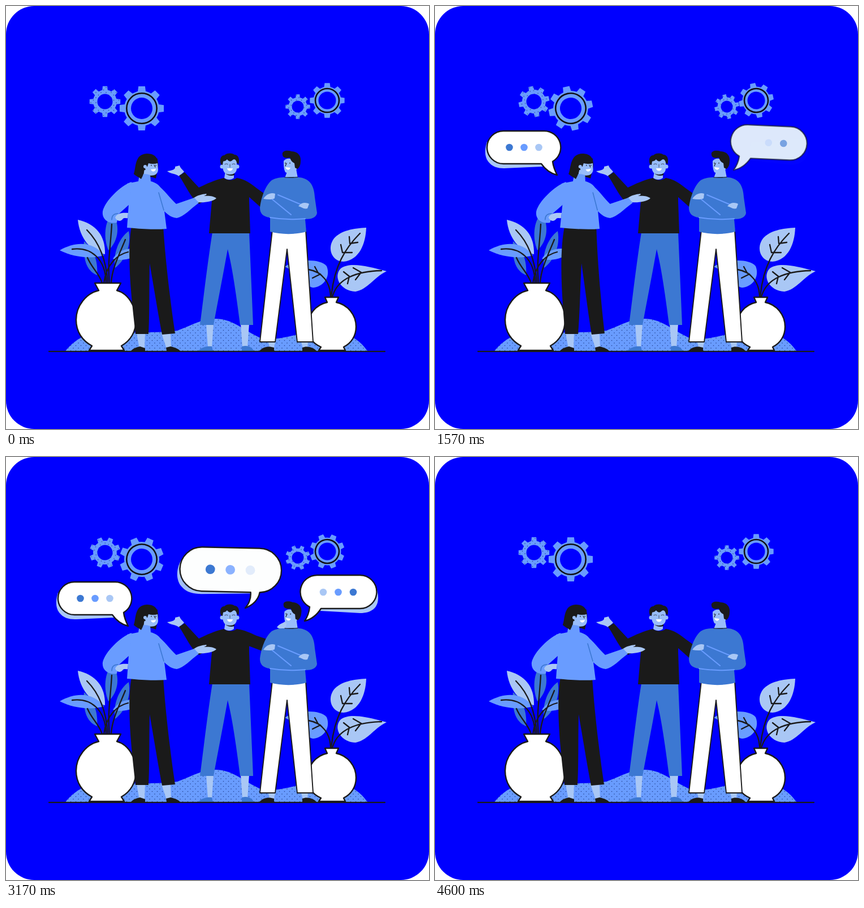
An HTML page for the animation above (4.63 s loop, 748 by 748 pixels).

```html
<!DOCTYPE html>
<html lang="en">
<head>
<meta charset="utf-8">
<title>Team talk</title>
<style>
html, body { margin: 0; width: 100%; height: 100%; overflow: hidden; background: #fff; }
svg { display: block; width: 100vw; height: 100vh; }
.k { fill: #1a1a1a; }
.l { fill: #699cff; }
.m { fill: #3c78d2; }
.p { fill: #a9c7f5; }
.s { fill: #98bdfa; }
.w { fill: #fff; }
.o { stroke: #1a1a1a; stroke-width: 2.4; stroke-linejoin: round; }
.thin { stroke-width: 1.9; }
.ln { fill: none; stroke: #1a1a1a; stroke-width: 2.3; stroke-linecap: round; }
.fine { fill: none; stroke: #1a1a1a; stroke-width: 1.1; stroke-linecap: round; }
.seam { fill: none; stroke: #699cff; stroke-width: 2; stroke-linecap: round; }
.fold { fill: none; stroke: #3c78d2; stroke-width: 1.6; stroke-linecap: round; }
</style>
</head>
<body>
<svg viewBox="0 0 748 748">
  <defs>
    <pattern id="dots" width="9" height="9" patternUnits="userSpaceOnUse">
      <rect width="9" height="9" fill="#699cff"/>
      <circle cx="2" cy="2" r=".8" fill="#23408c"/>
      <circle cx="6.5" cy="6.5" r=".8" fill="#23408c"/>
    </pattern>
  </defs>
  <rect width="748" height="748" rx="50" fill="#00f"/>
  <g id="gears"></g>

  <path fill="url(#dots)" d="M105 610C116 597 128 587 142 583C190 574 260 580 303 574C328 565 345 553 372 553C404 554 424 577 455 589C482 591 510 581 540 576C580 570 618 578 639 610Z"/>

  <g id="leftPlant">
    <path class="m" d="M138 416C155 430 163 450 161 476C141 468 136 445 138 416Z"/>
    <path class="m" d="M188 366C202 385 200 415 181 432C172 410 174 382 188 366Z"/>
    <path class="m" d="M217 398C222 425 210 450 193 463C189 440 198 412 217 398Z"/>
    <path class="p" d="M127 378C158 385 176 405 175 439C150 435 130 410 127 378Z"/>
    <path class="l" d="M95 432C125 415 155 417 173 441C150 448 118 444 95 432Z"/>
    <path class="l" d="M189 447C200 430 220 425 240 432C228 447 208 452 189 447Z"/>
    <path class="ln" d="M143 396C163 416 177 445 180 490M117 430C150 426 176 446 177 490M144 445C152 464 165 473 170 490M187 386C185 425 179 455 183 490M211 413C200 440 187 465 186 490M216 435C198 439 178 455 173 490"/>
  </g>
  <g id="rightPlant">
    <path class="l" d="M493 461C510 448 555 445 567 460C575 480 560 497 543 498C525 495 515 470 493 461Z"/>
    <path class="p" d="M637 392C636 420 625 449 597 452C576 452 567 428 580 411C592 397 615 393 637 392Z"/>
    <path class="p" d="M673 469C650 480 640 501 618 505C591 504 578 478 592 464C608 452 640 460 673 469Z"/>
    <path class="ln" d="M626 402C600 428 580 460 575 515M664 468C620 469 585 482 577 515M535 466C560 470 574 490 574 515M608 420L607 408M608 420L622 418M595 436L592 422M595 436L612 436M628 471L614 463M628 471L618 484M607 478L597 470M607 478L604 491M552 472L546 461M556 474L542 481"/>
  </g>
  <path class="w o" d="M157 490H203L196 503C215 508 230 530 230 555C230 576 220 592 204 601L209 609H147L152 601C135 592 124 576 124 555C124 530 142 508 164 503Z"/>
  <path class="w o" d="M564 515H588L584 524C604 528 619 546 619 567C619 583 611 596 597 603L600 609H553L557 603C541 596 533 583 533 567C533 546 548 528 568 524Z"/>

  <g id="speaker">
    <path class="p" d="M354 562H367L364 604H357ZM415 562H430L427 604H418Z"/>
    <path class="m" d="M340 610C346 603 356 601 364 602L366 610ZM417 602C428 599 436 604 438 610H417Z"/>
    <path class="m" d="M365 400H430L437 564H414C408 520 402 470 392 430C384 475 375 520 367 564H343C350 510 357 450 365 400Z"/>
    <path id="farHand" class="p" d="M479 301C484 294 490 294 495 290C499 291 496 296 497 298C496 304 485 306 479 301Z"/>
    <path id="farArm" class="k"/>
    <path id="nearHand" class="p" d="M285 292C294 291 300 289 299 284L307 282C308 286 311 288 315 293L306 301C300 296 290 297 285 292Z"/>
    <path id="nearArm" class="k"/>
    <path class="k" d="M385 304L364 314V345L359 402H432L430 345V314L408 304C402 309 392 309 385 304Z"/>
    <path class="s" d="M388 292H403V304C398 308 391 308 386 304Z"/>
    <path class="k" d="M389 295H404V299C399 301 393 300 389 297Z"/>
    <circle class="s" cx="382" cy="284" r="3.5"/><circle class="s" cx="409" cy="284" r="3.5"/>
    <path class="s" d="M383 270H408V285C409 295 402 298 396 298C388 298 384 294 383 285Z"/>
    <path class="k" d="M380 280C377 271 380 264 386 264C391 259 401 260 404 263C411 263 414 271 411 280L408 277C407 271 403 270 400 273C396 277 392 273 391 271C388 275 385 274 384 275L383 281Z"/>
    <path class="w" d="M391 287H401C400 293 392 293 391 287Z"/>
    <path class="fine" stroke-opacity=".6" d="M387 280Q390 278 392 280M400 280Q403 278 405 280M396 280V285"/>
  </g>

  <g id="listener">
    <path class="p" d="M464 594H476L474 605H466ZM522 594H534L533 605H525Z"/>
    <path class="k" d="M448 610C455 602 465 601 474 604V610ZM524 604C532 600 545 604 549 610H524Z"/>
    <path class="w o thin" d="M471 396L449 594H476L497 430L515 594H543L530 396Z"/>
    <g id="nod">
      <path class="s" d="M499 288H513L516 304H493Z"/>
      <circle class="s" cx="514" cy="284" r="3"/>
      <path class="s" d="M491 274C498 266 508 270 514 280V288C512 296 502 298 494 294C491 288 491 282 491 274Z"/>
      <path class="k" d="M489 263C487 256 497 254 505 257C515 257 522 264 521 274C521 282 518 287 515 288L511 286L510 278C505 276 503 271 502 268C496 270 489 268 489 263Z"/>
      <path class="w" d="M494 285L503 286C501 291 496 291 494 285Z"/>
      <path class="fine" d="M494 277V278.5M502 277V278.5M496 278L494 283"/>
    </g>
    <path class="m" d="M492 303C500 302 510 302 517 303C535 304 545 315 546 338L550 366C549 374 540 377 529 377L531 399C510 405 485 404 467 399V374C455 373 449 367 449 357C451 340 458 318 470 308C477 304 485 303 492 303Z"/>
    <path class="fine thin" d="M493 303Q504 304 516 302.5"/>
    <path class="seam" d="M481 334L524 352M471 342L504 369M467 374C490 378 510 378 529 376"/>
    <path class="p" d="M455 341C460 332 470 329 476 332L475 340C470 343 462 342 455 341Z"/>
    <path class="p" d="M517 354C523 347 530 347 536 350L533 358C527 360 522 355 517 354Z"/>
  </g>

  <path class="p" d="M231 579H246L245 606H236ZM275 579H291L292 606H284Z"/>
  <path class="k" d="M221 610C225 605 232 603 237 602L246 605V610ZM283 604L291 602C300 604 306 607 308 610H284Z"/>
  <g id="woman">
    <path class="k" d="M222 389H278C281 440 290 520 299 579L276 581C268 540 262 500 254 455C253 500 254 545 252 580H229C222 520 213 440 222 389Z"/>
    <path class="k" d="M226 297C230 286 227 262 249 261C266 261 270 272 269 285L265 305C256 301 245 300 239 306C234 302 229 300 226 297Z"/>
    <path class="s" d="M244 290H255V303H243Z"/>
    <path class="s" d="M247 276C252 274 262 274 268 277L269 290C268 299 260 301 252 299C248 296 246 290 246 284Z"/>
    <path class="l" d="M236 298C243 296 250 297 255 299L256 310C264 312 271 316 275 324L284 394C262 396 238 394 214 392L217 350L214 314L234 310Z"/>
    <path class="k" d="M226 297C231 286 230 272 236 266L250 264L268 270V278C261 280 256 279 252 278L250 284L245 285C245 292 243 299 239 306C234 302 229 300 226 297Z"/>
    <circle class="s" cx="246" cy="284" r="3"/>
    <path class="w" d="M256 289L265 288C264 294 258 294 256 289Z"/>
    <path class="fine" d="M257 281V282.5M265 281V282.5M262 281L264 285"/>
    <path id="hipArm" class="l"/>
    <path id="cuff" class="fold" d="M187 378C187 371 191 367 198 367"/>
    <path id="hipHand" class="p" d="M193 374C196 367 204 365 216 366L215 375C212 376 210 374 207 376C203 382 196 381 193 374Z"/>
    <path id="talkHand" class="p" d="M331 340C340 334 346 333 354 332C356 333 353 335 350 336C358 335 368 336 372 340C366 346 350 348 340 347Z"/>
    <path id="talkArm" class="l"/>
    <path class="fold" d="M270 330L279 361"/>
  </g>
  <path class="ln" d="M76 610.8H670"/>
  <g id="bubbles"></g>
</svg>
<script>
const LOOP = 4630;
const TURN = 4600; // one turn of the gears, then a short rest
const $ = id => document.getElementById(id);
const make = (parent, tag, attrs) => {
  const el = document.createElementNS('http://www.w3.org/2000/svg', tag);
  for (const key in attrs) el.setAttribute(key, attrs[key]);
  return parent.appendChild(el);
};

const ramp = (t, start, length) => Math.min(1, Math.max(0, (t - start) / length));
const smooth = x => x * x * (3 - 2 * x);
// Rises from a to b, holds, falls from c to d.
const bump = (t, a, b, c, d) => smooth(ramp(t, a, b - a)) - smooth(ramp(t, c, d - c));
const mix = (from, to, k) => {
  const ends = to.match(/-?[\d.]+/g);
  let i = 0;
  return from.replace(/-?[\d.]+/g, n => (+n + (ends[i++] - n) * k).toFixed(2));
};
const shift = (id, x, y) => $(id).setAttribute('transform', `translate(${x} ${y})`);

function gearPath(R, root, hole) {
  let d = '';
  for (let i = 0; i < 8; i++) {
    [[root, -13], [R, -8.5], [R, 8.5], [root, 13]].forEach(([r, deg], j) => {
      const a = (i * 45 + deg - 90) * Math.PI / 180;
      const point = `${(r * Math.cos(a)).toFixed(2)} ${(r * Math.sin(a)).toFixed(2)}`;
      d += i + j === 0 ? 'M' + point : j === 0 ? `A${root} ${root} 0 0 1 ${point}` : 'L' + point;
    });
  }
  return `${d}ZM${-hole} 0a${hole} ${hole} 0 1 0 ${2 * hole} 0a${hole} ${hole} 0 1 0 ${-2 * hole} 0Z`;
}

// x, y, outer radius, root radius, hole radius, ring radius
const gears = [
  [175, 169, 27.5, 21, 13.5, 0],
  [240, 181, 39.5, 31, 19, 26.7],
  [516, 178, 22, 16.5, 10.5, 0],
  [568, 167, 31, 24.5, 15.5, 21]
].map(([x, y, R, root, hole, ring]) => {
  const g = make($('gears'), 'g', {});
  make(g, 'path', { d: gearPath(R, root, hole), 'fill-rule': 'evenodd', fill: ring ? '#699cff' : 'url(#dots)' });
  if (ring) make(g, 'circle', { r: ring, fill: 'none', stroke: '#111', 'stroke-width': 2.6 });
  return { g, x, y };
});

const TONES = ['m', 'l', 'p'];
const bubbles = [
  {
    body: 'M121 221H193A29 29 0 0 1 208 275C209 284 212 291 216 299C204 296 195 289 188 279H121A29 29 0 0 1 121 221Z',
    shade: 'M92 240C88 252 87 266 94 275C101 284 110 287 122 287L190 284V240Z',
    tip: [216, 299], dots: [131.5, 26, 250, 6.3], start: 250, dotStart: 405, blink: 1990, tilt: -4.7
  },
  {
    body: 'M550 209H626A29.5 29.5 0 0 1 626 268H557C550 279 541 287 528 290C533 283 536 275 537 265A29.5 29.5 0 0 1 550 209Z',
    shade: 'M653 228C660 242 660 258 652 267C645 274 636 276 626 276L555 272V240Z',
    tip: [528, 290], dots: [614, -26.5, 239, 6.3], start: 1420, dotStart: 1490, blink: 3380, tilt: 4.7
  },
  {
    body: 'M345 161H445A39 39 0 0 1 448 239C446 252 436 262 423 267C430 259 433 250 432 239H345A39 39 0 0 1 345 161Z',
    shade: 'M308 185C299 200 299 221 310 232C319 242 331 244 345 244L434 241V200Z',
    tip: [423, 267], dots: [359.7, 35.4, 200, 8.4], start: 2925, dotStart: 3010, blink: LOOP, tilt: 4.7
  }
].map(b => {
  b.g = make($('bubbles'), 'g', {});
  b.under = make(b.g, 'path', { d: b.body, class: 'p' });
  b.edge = make(b.g, 'path', { d: b.shade, class: 'p' });
  b.face = make(b.g, 'path', { d: b.body, class: 'w o' });
  const [x, gap, y, r] = b.dots;
  b.circles = TONES.map((tone, i) => make(b.g, 'circle', { cx: x + gap * i, cy: y, r, class: tone }));
  return b;
});

const ARMS = {
  nearArm: ['M386 304C368 308 356 314 341 321L316 294L306 300C318 318 326 338 341 350L368 336Z',
            'M386 304C368 308 356 314 340 325L313 311L305 319C318 332 330 347 343 354L368 340Z'],
  farArm: ['M408 304C422 306 432 313 443 322L464 337L456 361L429 337Z',
           'M408 304C422 306 432 311 443 316L470 325L466 348L429 334Z'],
  hipArm: ['M222 311C202 318 175 345 171 363C169 378 183 386 196 383L199 368L219 350Z',
           'M222 311C204 318 188 342 183 360C181 376 192 385 208 383L212 370L219 354Z'],
  talkArm: ['M266 315C280 325 290 340 301 350L333 339L341 348C325 360 315 372 302 375C290 374 283 366 272 355Z',
            'M266 315C285 325 296 332 309 336L331 318L339 325C330 342 322 358 310 361C298 360 290 355 272 348Z']
};
const pose = (id, k) => $(id).setAttribute('d', mix(...ARMS[id], k));

function drawPeople(t) {
  const raise = bump(t, 150, 560, 740, 1150);
  const lean = bump(t, 1150, 1500, 1700, 2200);
  const reach = bump(t, 2800, 3060, 3280, 3620);
  const nod = bump(t, 1800, 2200, 3250, 3700);

  pose('nearArm', raise);
  pose('hipArm', raise);
  pose('talkArm', raise);
  pose('farArm', reach);
  shift('nearHand', -4.5 * raise, 20 * raise);
  shift('hipHand', 14 * raise, 7 * raise);
  shift('cuff', 14 * raise, 3 * raise);
  shift('talkHand', 0, -22.5 * raise);
  shift('farHand', 0, 34 * (1 - reach));
  $('woman').setAttribute('transform', `translate(0 608) skewX(${-1.9 * lean}) translate(0 -608)`);
  $('nod').setAttribute('transform', `rotate(${2.6 * nod} 505 303)`);
}

function drawBubble(b, t) {
  const shown = ramp(t, b.start, 250);
  const settle = ramp(t, b.start, 340);
  const [x, y] = b.tip;
  b.g.setAttribute('opacity', 1 - smooth(ramp(t, 4100, 270)));
  b.g.setAttribute('transform', `rotate(${b.tilt * (1 - settle)} ${x} ${y})`);
  b.under.setAttribute('opacity', ramp(shown, 0, .5));
  b.edge.setAttribute('opacity', ramp(shown, .6, .4));
  b.face.setAttribute('opacity', shown);
  b.circles.forEach((c, i) => {
    const lag = 60 * i;
    c.setAttribute('opacity', ramp(t, b.dotStart + lag, 130)
      - ramp(t, b.blink + lag, 260) + ramp(t, b.blink + 390 + lag, 130));
  });
}

function draw(t) {
  const angle = 360 * ramp(t, 0, TURN);
  for (const { g, x, y } of gears)
    g.setAttribute('transform', `translate(${x} ${y}) rotate(${angle})`);
  drawPeople(t);
  for (const b of bubbles) drawBubble(b, t);
}

const begin = performance.now();
function tick() {
  draw((performance.now() - begin) % LOOP);
  requestAnimationFrame(tick);
}
tick();
</script>
</body>
</html>
```
